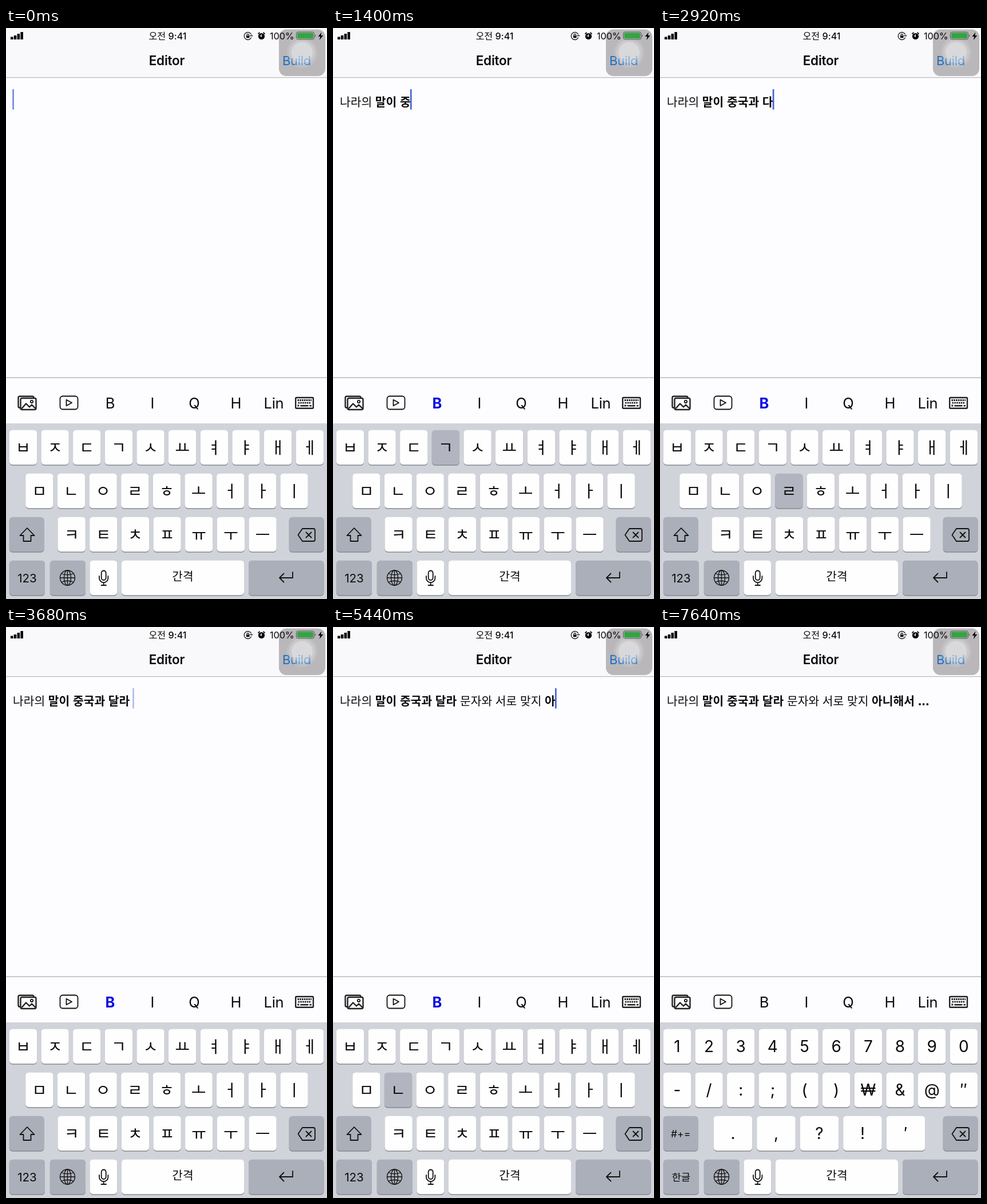
An HTML page for the animation above (7720 ms loop, 561x998 px).

```html
<!DOCTYPE html>
<html lang="ko">
<head>
<meta charset="utf-8">
<title>Editor</title>
<style>
  html, body { margin: 0; width: 100%; height: 100%; overflow: hidden; background: #fdfcfe; }
  svg { display: block; width: 100vw; height: 100vh; }
  text { font-family: Inter, "Noto Sans CJK KR", "Noto Sans CJK", sans-serif; fill: #0a0a0a; }
  .mid { text-anchor: middle; }
  .ko { font-family: "Noto Sans CJK KR", "Noto Sans CJK", sans-serif; }
  .line { fill: none; stroke: #111; stroke-width: 1.8; stroke-linejoin: round; stroke-linecap: round; }
  .thin { stroke-width: 1.3; }
  .thick { stroke-width: 2.4; stroke: #222; }
  .key { fill: #fefefe; }
  .dark { fill: #abafb9; }
  .key.down { fill: #b2b5c0; }
  .dark.down { fill: #fefefe; }
</style>
</head>
<body>
<svg viewBox="0 0 561 998">
  <rect width="561" height="998" fill="#fdfcfe"/>
  <rect width="561" height="86" fill="#f9f8fa"/>
  <rect y="86" width="561" height="1.2" fill="#b9b8bb"/>
  <rect y="610.5" width="561" height="1.2" fill="#a9a8ab"/>
  <rect y="691" width="561" height="307" fill="#d1d3da"/>

  <g id="status">
    <path d="M8 15.500h4.500v4.500H8zM13.800 13h4.500v7h-4.500zM19.600 10h4.500v10h-4.500zM25.400 7h4.500v13h-4.500z"/>
    <text class="mid" x="282.500" y="20" font-size="16.200" font-weight="500">오전 9:41</text>
    <path class="line thin" d="M428.500 11A6.500 6.500 0 1 0 428.500 17M426.800 13.500h4M421 13.500v-1.200a1.700 1.700 0 0 1 3.400 0v1.200"/>
    <rect x="420" y="13.500" width="5.500" height="3.800"/>
    <circle cx="446.500" cy="14.500" r="5.600"/>
    <path class="line" d="M441 10l2-1.800M452 10l-2-1.800"/>
    <path d="M446.500 11v4l-2.800-1.800" fill="none" stroke="#fff" stroke-width="1.200"/>
  </g>

  <g id="touch">
    <rect x="477" y="2.500" width="81" height="81.500" rx="13" fill="#b9b7ba"/>
    <text class="mid" x="508" y="65" font-size="22" letter-spacing="-.3" style="fill:#1a6fc6">Build</text>
    <circle cx="517.500" cy="43" r="27" fill="#fff" opacity=".1"/>
    <circle cx="517.500" cy="43" r="23" fill="#fff" opacity=".16"/>
    <circle cx="517.500" cy="43" r="18.500" fill="#fff" opacity=".28"/>
  </g>
  <text x="461" y="20" font-size="16.300" letter-spacing="-.1">100%</text>
  <rect x="507.500" y="7" width="31" height="13" rx="3" fill="none" stroke="#555"/>
  <rect x="509" y="8.500" width="28" height="10" rx="1.800" fill="#35a343"/>
  <path d="M540 11q2.500 2.500 0 5z" fill="#555"/>
  <path d="M551.500 7.500l-6 7.500h3.800l-1.500 6 6.500-8h-4z"/>
  <text class="mid" x="281" y="65" font-size="22.500" font-weight="600" letter-spacing="-.2">Editor</text>

  <text id="typed" class="ko" x="12" y="137" font-size="20.350"></text>
  <rect id="caret" y="107" width="2.700" height="35.500" fill="#4565d8"/>

  <g id="toolbar" font-size="25.500">
    <rect class="line thick" x="21.500" y="643.700" width="27" height="20" rx="2.500"/>
    <rect class="line thick" x="25.500" y="647" width="27" height="20" rx="2.500" style="fill:#fdfcfe"/>
    <path class="line thick" d="M28 664.500l7-8 6 6 4-4 6 6"/>
    <circle cx="45" cy="653" r="2.200" class="line"/>
    <rect class="line" x="94.500" y="643.500" width="31" height="23" rx="4.500"/>
    <path class="line" d="M105.500 649.800v10.500l9.500-5.250z"/>
    <text class="mid" id="bold" x="182" y="665">B</text>
    <text class="mid" x="256" y="665">I</text>
    <text class="mid" x="329" y="665">Q</text>
    <text class="mid" x="402" y="665">H</text>
    <text class="mid" x="468" y="665" letter-spacing="-.3">Lin</text>
    <rect class="line thick" x="506.200" y="646" width="30.800" height="18.800" rx="1.500"/>
    <path class="line thick" style="stroke-linecap:butt;stroke-width:2.800;stroke-dasharray:2.600 1.200" d="M509.500 650.500h24.500M510.500 655.200h23M509.500 660h4"/>
    <path class="line thick" d="M515.500 660.200h12M531.500 660.200h1.500"/>
  </g>
  <g id="keyboard"></g>
  <g id="hangul"></g>
  <g id="symbols"></g>
  <text class="mid ko" x="309" y="966" font-size="20.300">간격</text>
  <g id="glyphs" class="line">
    <path d="M518 875h19q3 0 3 3v16q0 3-3 3h-19l-7.500-11zM524.500 881.500l9 9M533.500 881.500l-9 9"/>
    <path d="M501 951v10h-23M485.500 953.500l-7.500 7.500 7.500 7.500"/>
    <g class="thin">
      <circle cx="107.500" cy="961" r="13"/>
      <ellipse cx="107.500" cy="961" rx="6" ry="13"/>
      <path d="M107.500 948v26M94.500 961h26M97 953.500q10.500 4.500 21 0M97 968.500q10.500-4.500 21 0"/>
    </g>
    <rect x="166.700" y="948.500" width="8" height="16.500" rx="4"/>
    <path d="M163 958v3.500a7.700 7.700 0 0 0 15.400 0V958M170.700 969.500v4.500M166.500 974h8.500"/>
  </g>
</svg>
<script>
const LOOP = 7720, TICK = 40, HOLD = 65, TEXT_X = 12;
const $ = id => document.getElementById(id);

function add(parent, tag, attrs, text = '') {
  const node = document.createElementNS('http://www.w3.org/2000/svg', tag);
  for (const name in attrs) node.setAttribute(name, attrs[name]);
  node.textContent = text;
  parent.appendChild(node);
  return node;
}

// --- Keyboard ---
const keys = {};
const rowY = row => 702.7 + 76 * row;

function addKey(parent, name, x, row, w, label = name, size = 28, dark = false) {
  const y = rowY(row), box = { x, width: w, height: 60.5, rx: 5.5 };
  add(parent, 'rect', { ...box, y: y + 1.5, fill: '#87898e' });
  keys[name] = add(parent, 'rect', { ...box, y, class: dark ? 'key dark' : 'key' });
  if (!label) return;
  const korean = /[ㄱ-힣]/.test(label);
  add(parent, 'text', {
    x: x + w / 2, y: y + 30.5 + size * (korean ? 0.38 : 0.364),
    'font-size': size, class: korean ? 'mid ko' : 'mid'
  }, label);
}

function addRow(parent, labels, x, row, pitch = 55.65, w = 48.3) {
  [...labels].forEach((label, i) => addKey(parent, label, x + pitch * i, row, w));
}

const shared = $('keyboard'), hangul = $('hangul'), symbols = $('symbols');
addKey(shared, 'del', 494.7, 2, 60.8, '', 0, true);
addKey(shared, 'globe', 76.8, 3, 62.2, '', 0, true);
addKey(shared, 'mic', 146.5, 3, 47.7, '');
addKey(shared, ' ', 202, 3, 214, '');
addKey(shared, 'return', 424, 3, 131.5, '', 0, true);

addRow(hangul, 'ㅂㅈㄷㄱㅅㅛㅕㅑㅐㅔ', 5.8, 0);
addRow(hangul, 'ㅁㄴㅇㄹㅎㅗㅓㅏㅣ', 34.2, 1);
addRow(hangul, 'ㅋㅌㅊㅍㅠㅜㅡ', 90.5, 2);
addKey(hangul, 'shift', 5.8, 2, 60.7, '', 0, true);
addKey(hangul, '123', 5.8, 3, 62.2, '123', 20.5, true);
add(hangul, 'path', { class: 'line', d: 'M37 874l12.500 13h-6v10h-13v-10h-6z' });

addRow(symbols, '1234567890', 5.8, 0);
addRow(symbols, '-/:;()₩&@″', 5.8, 1);
addRow(symbols, '.,?!′', 93.7, 2, 75.5, 67.5);
addKey(symbols, '#+=', 5.8, 2, 60.7, '#+=', 17.5, true);
addKey(symbols, '한글', 5.8, 3, 62.2, '한글', 17.5, true);

// --- Typing script: [start, gap, keys]; a key takes effect when released ---
const script = [
  [120, 48, 'ㄴㅏㄹㅏㅇㅡㅣ '],
  [640, 0, ['bold']],
  [840, 68, 'ㅁㅏㄹㅇㅣ ㅈㅜㅇㄱㄱㅜㄱ'],
  [2120, 100, ['del', 'del', 'del']],
  [2460, 64, 'ㅜㄱㄱㅗㅏ ㄷㅏㄹㄹㅏ '],
  [3820, 0, ['bold']],
  [4040, 48, 'ㅁㅜㄴㅈㅏㅇㅗㅏ ㅅㅓㄹㅗ'],
  [4730, 70, ' ㅁㅏㅈㅈㅣ '],
  [5290, 0, ['bold']],
  [5360, 50, 'ㅇㅏㄴㅣㅎㅏ'],
  [5680, 0, ['del']],
  [6020, 90, 'ㅐㅅ'],
  [6230, 230, 'ㅓ '],
  [6620, 0, ['123']],
  [6780, 90, '...'],
  [7300, 0, ['bold']]
];
const strokes = script.flatMap(([start, gap, list]) =>
  [...list].map((key, i) => ({ key, at: start + gap * i })));

// --- Hangul composition ---
const LEADS = 'ㄱㄲㄴㄷㄸㄹㅁㅂㅃㅅㅆㅇㅈㅉㅊㅋㅌㅍㅎ';
const VOWELS = 'ㅏㅐㅑㅒㅓㅔㅕㅖㅗㅘㅙㅚㅛㅜㅝㅞㅟㅠㅡㅢㅣ';
const TAILS = ' ㄱㄲㄳㄴㄵㄶㄷㄹㄺㄻㄼㄽㄾㄿㅀㅁㅂㅄㅅㅆㅇㅈㅊㅋㅌㅍㅎ';

function compose(jamo) {
  return jamo
    .replace(/ㅗㅏ/g, 'ㅘ').replace(/ㅡㅣ/g, 'ㅢ').replace(/ㅇㄱㄱ/g, 'ㅇㄲ')
    .replace(/([ㄱ-ㅎ])([ㅏ-ㅣ])([ㄱ-ㅎ](?![ㅏ-ㅣ]))?/g, (_, lead, vowel, tail = ' ') =>
      String.fromCharCode(0xAC00 + (LEADS.indexOf(lead) * 21 + VOWELS.indexOf(vowel)) * 28 + TAILS.indexOf(tail)))
    .replace(/ /g, '\u00a0');
}

function stateAt(time) {
  const state = { runs: [''], bold: false, symbols: false, last: -450 };
  for (const { key, at } of strokes) {
    if (at > time) break;
    const end = state.runs.length - 1;
    if (key === 'bold') {
      state.bold = !state.bold;
      state.runs.push('');
      continue;
    }
    if (key === '123') state.symbols = true;
    else if (key === 'del') state.runs[end] = state.runs[end].slice(0, -1);
    else state.runs[end] += key;
    state.last = at;
  }
  return state;
}

function caretOpacity(idle) {
  const phase = idle % 1000;
  if (phase < 400) return 1;
  if (phase < 600) return 1 - (phase - 400) / 200;
  return Math.max(0, (phase - 800) / 200);
}

// --- Drawing ---
const typed = $('typed'), caret = $('caret'), boldButton = $('bold');

function draw(time) {
  const state = stateAt(time);
  typed.textContent = '';
  state.runs.forEach((run, i) => {
    if (run) add(typed, 'tspan', { 'font-weight': i % 2 ? 700 : 400 }, compose(run));
  });
  const width = typed.textContent ? typed.getComputedTextLength() : 0;
  caret.setAttribute('x', TEXT_X + width - 0.8);
  caret.setAttribute('opacity', caretOpacity(time - state.last));

  boldButton.style.fill = state.bold ? '#0808e2' : '';
  boldButton.style.fontWeight = state.bold ? 700 : 400;
  hangul.style.display = state.symbols ? 'none' : '';
  symbols.style.display = state.symbols ? '' : 'none';

  for (const name in keys) keys[name].classList.remove('down');
  for (const { key, at } of strokes)
    if (keys[key] && time >= at - HOLD && time < at) keys[key].classList.add('down');
}

const begin = performance.now();
function frame() {
  const time = (performance.now() - begin) % LOOP;
  draw(time - time % TICK);
  requestAnimationFrame(frame);
}
frame();
</script>
</body>
</html>
```
